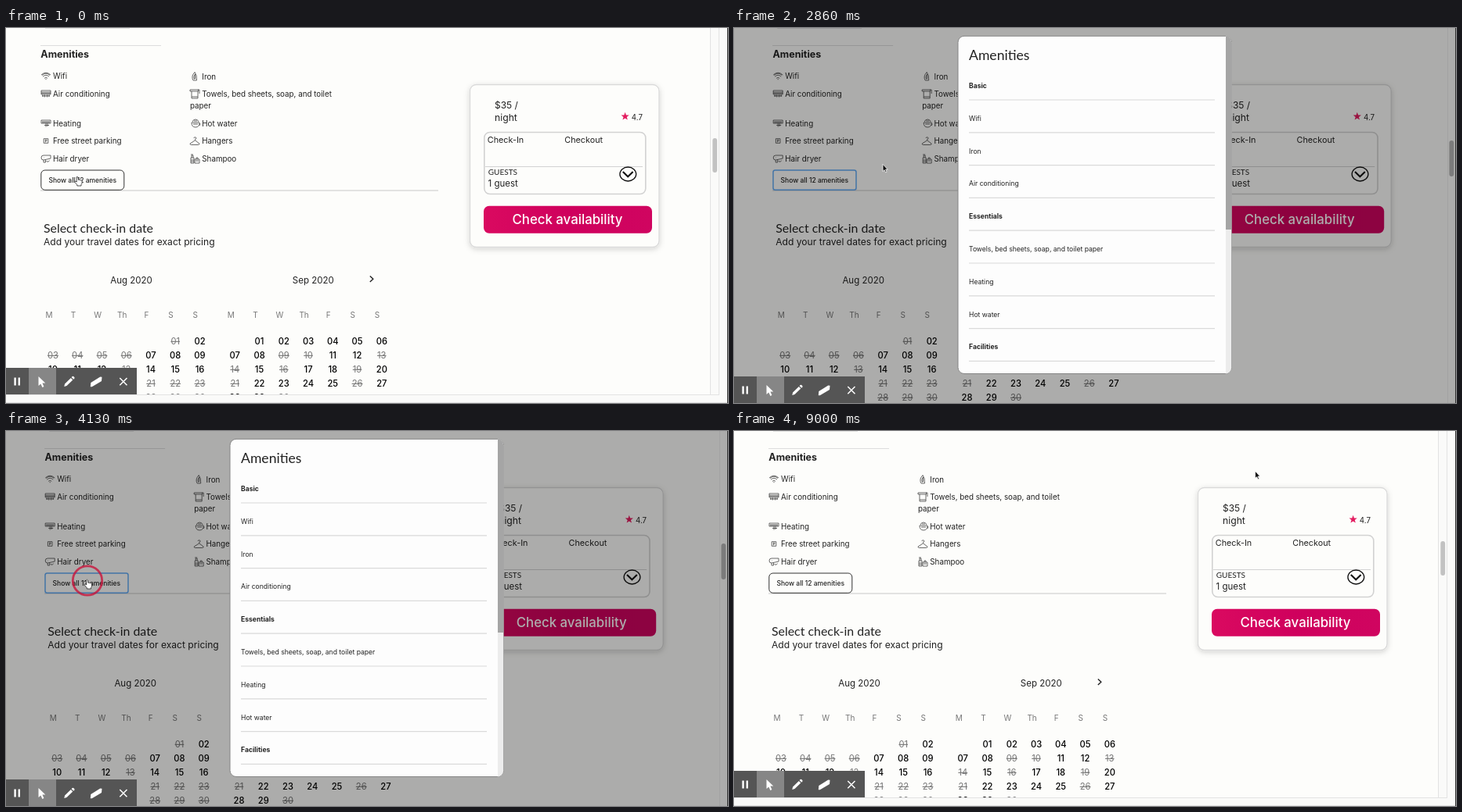
An HTML page for the animation above (9.06 s loop, 922 by 480 pixels).

```html
<!DOCTYPE html>
<html lang="en">
<head>
<meta charset="utf-8">
<title>Amenities dialog</title>
<style>
  html, body { margin: 0; width: 100%; height: 100%; overflow: hidden; background: #fdfdfb; }
  svg { display: block; width: 922px; height: 480px; font-family: Inter, sans-serif; }
  text { fill: #222; white-space: pre; }
  .lato { font-family: Lato, sans-serif; }
  .mid { text-anchor: middle; }
  .medium { font-weight: 500; }
  .bold { font-weight: 700; }
  .day { font-weight: 500; fill: #000; }
  .grey { fill: #777; }
  .white { fill: #fff; }
  .off { fill: #777; text-decoration: line-through; }
  .icon { fill: none; stroke: #444; stroke-width: .8; }
</style>
</head>
<body>
<svg viewBox="0 0 922 480">
  <defs>
    <linearGradient id="pink"><stop stop-color="#da0a60"/><stop offset=".5" stop-color="#cf005d"/><stop offset="1" stop-color="#d00560"/></linearGradient>
    <filter id="shadow" x="-10%" y="-10%" width="120%" height="120%"><feDropShadow dx="0" dy="2" stdDeviation="3.5" flood-opacity=".17"/></filter>
    <clipPath id="round"><rect x="286" y="10.3" width="349.2" height="432.2" rx="8"/></clipPath>
  </defs>
  <rect width="922" height="480" fill="#fdfdfb"/>
  <g id="page">
    <path d="M50 .3H158M44 22.5H198" stroke="#ddd"/>
    <path d="M44 208H552" stroke="#c8c8c8"/>
    <g id="list"></g>
    <rect id="show" x="44.8" y="182" width="106" height="25.3" fill="#fdfdfb"/>
    <g id="calendar"></g>
    <path d="M464.8 317.5l4 3.7-4 3.7" fill="none" stroke="#222" stroke-width="1.4"/>
    <rect x="592.5" y="72.5" width="241.5" height="208" rx="8" fill="#fdfdfb" stroke="#d9d9d9" stroke-width="1.3" filter="url(#shadow)"/>
    <rect x="610.8" y="133.5" width="206" height="79" rx="7" fill="none" stroke="#d2d2d2" stroke-width="1.6"/>
    <path d="M612 177.5H813" stroke="#d2d2d2"/>
    <path id="star" fill="#e31c5f"/>
    <ellipse cx="794.3" cy="187" rx="10.4" ry="9" fill="none" stroke="#111" stroke-width="1.3"/>
    <path d="M787.8 184l6.4 6.2 6.4-6.2" fill="none" stroke="#111" stroke-width="2.1"/>
    <rect x="610" y="227.8" width="215" height="34.9" rx="7" fill="url(#pink)"/>
    <g id="labels"></g>
  </g>
  <g id="bars">
    <path d="M900 0h21v480H0V470H900z" fill="#fafaf9"/>
    <path d="M899.5 0V469.5M910.5 0V469.5M0 469.5H911M0 479.5H922" stroke="#e3e3e3" fill="none"/>
    <rect x="902.3" y="141" width="5.8" height="44" rx="2.9" fill="#c2c2c2"/>
  </g>
  <g id="dialog">
    <path d="M911.5 0V480" stroke="#eee"/>
    <rect x="913.4" y="144" width="5.8" height="46" rx="2.9" fill="#b5b5b5"/>
    <rect width="922" height="480" fill="#000" opacity=".32"/>
    <rect x="286" y="10.3" width="349.2" height="432.2" rx="8" fill="#fdfdfd" stroke="#858585"/>
    <g clip-path="url(#round)">
      <path d="M628 10h8v433h-8z" fill="#ececec"/>
      <path d="M628 10h8v248h-8z" fill="#a5a5a5"/>
    </g>
    <g id="rows"></g>
  </g>
  <path d="M921.5 0V480" stroke="#333"/>
  <g id="toolbar">
    <path d="M0 435H167V469H0z" fill="#555"/>
    <path d="M29 435H64V469H29z" fill="#868686"/>
    <path d="M11.6 447.5v10M16.8 447.5v10" stroke="#fff" stroke-width="2.4"/>
    <path d="M41.5 446v12l2.9-2.6 2 4.6 2-.9-2-4.5h3.9z" fill="#fff"/>
    <path d="M74.3 459l.8-3.4 7.7-7.7 2.5 2.5-7.8 7.7zM83.6 447.1l1.1-1.1q1-.6 1.9.3l.6.7q.8.9.1 1.7l-1.1 1.1z" fill="#fff"/>
    <path d="M107.8 459.3l.5-5.4 12-7.4 2.2.2-.5 5.2-12.2 7.3z" fill="#fff"/>
    <path d="M145.3 448l9.2 9.2m0-9.2l-9.2 9.2" stroke="#fff" stroke-width="1.5"/>
  </g>
  <circle id="ring" fill="none" stroke="#c9113a" stroke-width="2.8"/>
  <g id="cursor" stroke="#fff" stroke-width=".8" stroke-linejoin="round">
    <path id="arrow" d="M0 0V9.2L2.1 7.4 3.6 10.6 5.1 9.9 3.6 6.8H6.3z" fill="#111"/>
    <path id="hand" d="M-1.1 1q1-1.4 2 0l.5 3.4q1-.8 1.7.2 1-.6 1.6.3 1.2-.4 1.4.9v2.3q-.3 1.7-1.1 2.4V12H-.2v-1.3L-3.2 7.3q-.4-1.7 1.1-1.2L-.7 7z" fill="#fff" stroke="#222"/>
  </g>
</svg>
<script>
const $ = id => document.getElementById(id);
const text = (x, y, size, str, cls = '') =>
  `<text x="${x}" y="${y}" font-size="${size}" class="${cls}">${str}</text>`;
const icon = (x, y, d) => `<path class="icon" transform="translate(${x} ${y})" d="${d}"/>`;

// Amenity list: [x, y of the row centre, label, icon outline]
const amenities = [
  [51, 61.5, 'Wifi', 'M-6-1.5Q0-7 6-1.5M-4 .7Q0-3 4 .7M-2 2.8Q0 1 2 2.8M-.6 4.2h1.2M-5-1Q0-5.6 5-1'],
  [51, 84, 'Air conditioning', 'M-6-4H6V1H-6zM-6-2H6M-6-.5H6M-4 1V4M-1.5 1V4.5M1.5 1V4.5M4 1V4M-5 3H5'],
  [51, 122, 'Heating', 'M-6-4H6V0H-6zM-5-2H5M-5-1H5M-2 2.5H4M0 0V4.5M2 0V4'],
  [51, 144.5, 'Free street parking', 'M-2.8-2.8H2.8V2.8H-2.8zM-.6 1.8V-1.6H.6Q1.6-.6.6.3H-.6'],
  [51, 167, 'Hair dryer', 'M6-4H-3A3 3 0 0 0-3 2L6 0zM-3-1h.5M-3 2v3h2.5V1.5M.5 3.5q3 2 4-1'],
  [241, 62, 'Iron', 'M-2 5Q-5 0 0-5.5 3-2 2.5 5zM-1 3Q-2 0 .5-3V3z'],
  [241, 84, 'Towels, bed sheets, soap, and toilet', 'M-6-5H4.5V-3H-6zM-4-3V6H4V-3M4-5H6V0M-4 4H4'],
  [242, 122, 'Hot water', 'M-5-1H5Q5 5 0 5-5 5-5-1zM-4-2Q-3-5 0-5T4-2M-2-3H2M5 0q2 0 0 3M-3 1H3'],
  [241, 144.5, 'Hangers', 'M-1-3.5A1.4 1.4 0 1 1 .5-2V-.7L6 3.5Q6 5 4.5 5H-4.5Q-6 5-6 3.5L.5-.7'],
  [241, 167, 'Shampoo', 'M-5-1H-1V6H-5zM-4-1V-4H-2V-1M-5-5H-2M0 1H6V6H0zM1 3H5M2 1V-1H4V1M-5 2H-1M-5 4H-1']
];
$('list').innerHTML = text(44.3, 37.5, 12.5, 'Amenities', 'bold') + text(235, 103, 9.8, 'paper') +
  amenities.map(([x, y, label, d]) => icon(x, y, d) + text(x < 100 ? 60 : 250.3, y + 3.5, 9.8, label)).join('');

// Month grid; start is the weekday of the first day
function month(left, title, start, days, taken) {
  let out = text(left + 100, 327, 11.5, title, 'mid');
  ['M', 'T', 'W', 'Th', 'F', 'S', 'S'].forEach((day, i) =>
    out += text(left - 5 + i * 31.1, 370.5, 10, day, 'mid grey'));
  for (let d = 1; d <= days; d++) {
    const cell = d - 1 + start;
    out += text(left + cell % 7 * 31.25, 405 + Math.floor(cell / 7) * 18, 11.2,
      String(d).padStart(2, '0'), taken.includes(d) ? 'mid off' : 'mid day');
  }
  return out;
}
$('calendar').innerHTML =
  text(48, 262.1, 15.9, 'Select check-in date', 'lato') +
  text(48, 278.3, 12.1, 'Add your travel dates for exact pricing') +
  month(60, 'Aug 2020', 5, 31, [1, 3, 4, 5, 6, 13, 21, 22, 23, 28, 29, 30]) +
  month(292.3, 'Sep 2020', 1, 30, [9, 10, 13, 14, 16, 19, 21, 26, 30]);

$('labels').innerHTML =
  text(97.7, 197.6, 8.5, 'Show all 12 amenities', 'mid medium') +
  text(624, 102.5, 12, '$35 /') + text(624, 118.5, 12.2, 'night') + text(798.8, 118, 9.7, '4.7') +
  text(614.8, 147, 10.8, 'Check-In') + text(713.3, 147, 10.8, 'Checkout') +
  text(615.8, 187.6, 10, 'GUESTS', 'lato') + text(615.5, 203, 11.5, '1 guest') +
  text(717, 250.5, 16.8, 'Check availability', 'mid medium white');

$('star').setAttribute('d', 'M' + Array.from({length: 10}, (_, i) => {
  const r = i % 2 ? 2.2 : 5.4, a = i * Math.PI / 5;
  return [790.6 + r * Math.sin(a), 113.2 - r * Math.cos(a)].map(v => v.toFixed(1));
}).join('L') + 'z');

const rows = ['*Basic', 'Wifi', 'Iron', 'Air conditioning', '*Essentials',
  'Towels, bed sheets, soap, and toilet paper', 'Heating', 'Hot water', '*Facilities'];
$('rows').innerHTML = text(300, 41.3, 17.6, 'Amenities', 'lato') + rows.map((row, i) => {
  const y = 77 + i * 41.8;
  return text(300, y, 8.6, row.replace('*', ''), row[0] === '*' ? 'bold' : '') +
    `<path d="M300 ${y + 15}H614" stroke="#dadada" stroke-width="1.2"/>`;
}).join('');

const LOOP = 9060;
// Pointer stops: time, x, y; a repeated time is a jump
const stops = [
  [0, 91, 190], [660, 91, 190], [660, 90, 190], [1600, 90, 190], [2800, 190, 174.3], [3350, 190, 174.3],
  [3850, 103.5, 190], [4250, 103.5, 190], [4500, 105.5, 190], [5060, 105.5, 190], [5660, 606, -2],
  [7400, 606, -2], [7400, 658.5, 66.7], [7660, 658.5, 66.7], [7660, 661, 75], [8260, 661, 75], [8260, 665.5, 51.3]
];
const clicks = [1200, 2980, 3965, 4620];
const within = (t, ...spans) => spans.some(([a, b]) => t >= a && t < b);
const show = (id, on) => $(id).setAttribute('display', on ? 'inline' : 'none');
const set = (id, attrs) => { for (const k in attrs) $(id).setAttribute(k, attrs[k]); };

function pointer(t) {
  const i = stops.findLastIndex(s => s[0] <= t);
  const [t0, x0, y0] = stops[i], [t1, x1, y1] = stops[i + 1] || [LOOP, x0, y0];
  const p = (t - t0) / (t1 - t0), k = p * p * (3 - 2 * p);
  return [x0 + (x1 - x0) * k, y0 + (y1 - y0) * k];
}

function draw(now) {
  const t = now % LOOP;
  const open = within(t, [1400, 3260], [4130, 4800]);
  const focus = within(t, [1200, 3000], [3960, 4640]);
  const hand = within(t, [0, 1480], [3780, 4200]);
  const [x, y] = pointer(t);

  show('dialog', open);
  show('bars', !open);
  set('page', {transform: `translate(${open ? 5.2 : 0} 0)`});
  set('toolbar', {transform: `translate(0 ${open ? 11 : 0})`});
  set('show', focus
    ? {stroke: '#62aaf4', 'stroke-width': 1.5, rx: 2.5}
    : {stroke: '#333', 'stroke-width': 1, rx: 5});

  set('cursor', {transform: `translate(${x} ${y})`});
  show('hand', hand);
  show('arrow', !hand);

  const age = t - (clicks.findLast(c => c <= t) ?? -LOOP);
  show('ring', age < 440);
  set('ring', {cx: x + .5, cy: y + 1.5, r: 22.5 * Math.min(1, age / 200),
    opacity: .78 * Math.min(1, Math.max(0, 1 - (age - 200) / 240))});
}

const start = performance.now();
function tick() {
  draw(performance.now() - start);
  requestAnimationFrame(tick);
}
tick();
</script>
</body>
</html>
```
